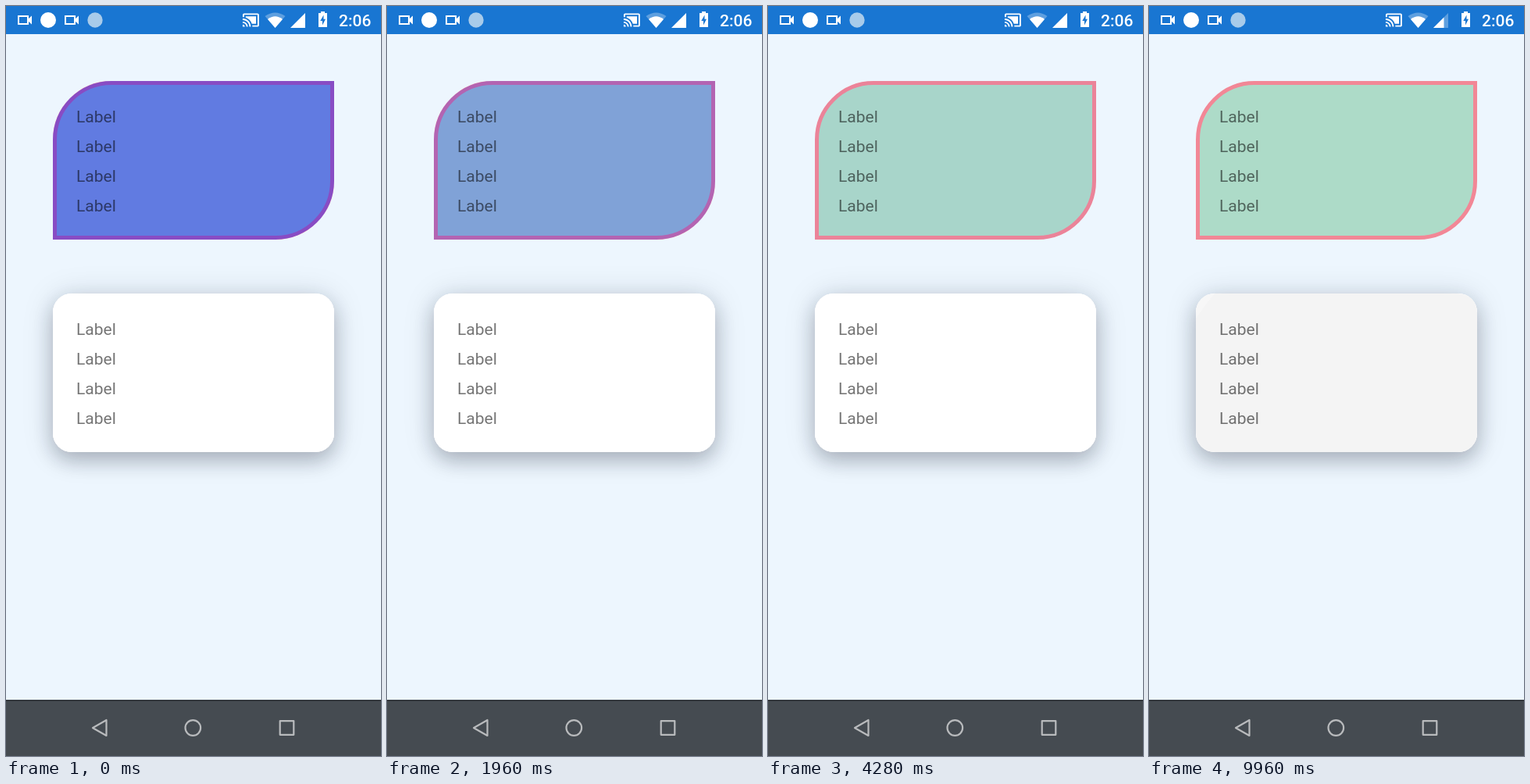
An HTML page with a canvas for the animation above (10000 ms loop, 480x960 px).

```html
<!DOCTYPE html>
<html lang="en">
<head>
<meta charset="utf-8">
<title>Touch ripples on cards</title>
<style>
html, body { margin: 0; width: 100%; height: 100%; overflow: hidden; background: #edf6fe; }
canvas { display: block; width: 480px; height: 960px; }
</style>
</head>
<body>
<canvas id="stage" width="480" height="960"></canvas>
<script>
const LOOP = 10000;
const ctx = document.getElementById('stage').getContext('2d');
const clamp = v => Math.max(0, Math.min(1, v));
const lerp = (a, b, k) => a + (b - a) * k;

// Touches: time down, time up, position
const leafTouches = [
  { down: -525, up: 640, x: 300, y: 215 },
  { down: 1646, up: 3045, x: 300, y: 215 },
  { down: 4246, up: 4335, x: 370, y: 152 }
];
const sheetTouches = [
  { down: 6525, up: 7610, x: 290, y: 500 },
  { down: 8330, up: 8820, x: 290, y: 500 },
  { down: 9540, up: 9630, x: 292, y: 565 }
];

function leafPath(inset) {
  const l = 60 + inset, t = 96 + inset, r = 420 - inset, b = 299 - inset, c = 75 - inset;
  const p = new Path2D();
  p.moveTo(l + c, t);
  p.lineTo(r, t);
  p.lineTo(r, b - c);
  p.arc(r - c, b - c, c, 0, Math.PI / 2);
  p.lineTo(l, b);
  p.lineTo(l, t + c);
  p.arc(l + c, t + c, c, Math.PI, Math.PI * 1.5);
  p.closePath();
  return p;
}

const leaf = leafPath(0);
const leafEdge = leafPath(2.5);
const sheet = new Path2D();
sheet.roundRect(60, 368, 360, 203, 24);

const castIcon = new Path2D('M1 18v3h3c0-1.66-1.34-3-3-3zm0-4v2c2.76 0 5 2.24 5 5h2c0-3.87-3.13-7-7-7z' +
  'm18-7H5v1.63c3.96 1.28 7.09 4.41 8.37 8.37H19V7zM1 10v2c4.97 0 9 4.03 9 9h2c0-6.08-4.93-11-11-11z' +
  'm20-7H3c-1.1 0-2 .9-2 2v3h2V5h18v14h-7v2h7c1.1 0 2-.9 2-2V5c0-1.1-.9-2-2-2z');

function fill(path, color) {
  ctx.fillStyle = color;
  ctx.fill(typeof path === 'string' ? new Path2D(path) : path);
}

function disc(x, y, r, color) {
  ctx.fillStyle = color;
  ctx.beginPath();
  ctx.arc(x, y, r, 0, Math.PI * 2);
  ctx.fill();
}

// Tint fades in while held; on release it tops up quickly, then fades out
function tintLevel(touch, t) {
  const held = clamp((Math.min(t, touch.up) - touch.down) / 600);
  if (t < touch.up) return held;
  const topUp = (1 - held) * 120;
  const after = t - touch.up;
  if (after < topUp) return held + after / 120;
  return clamp(1 - (after - topUp) / 480);
}

const decelerate = k => (1 - Math.pow(400, -k / 1.4)) / (1 - Math.pow(400, -1 / 1.4));

function ripple(path, touches, t, rgb, strength, cy) {
  ctx.save();
  ctx.clip(path);
  for (const touch of touches) {
    const level = tintLevel(touch, t);
    if (level > 0) {
      ctx.fillStyle = `rgba(${rgb},${level * strength})`;
      ctx.fillRect(50, 90, 380, 490);
    }
    const after = t - touch.up;
    if (after > 0 && after < 400) {
      const k = decelerate(after / 800);
      disc(lerp(touch.x, 240, k * 0.35), lerp(touch.y, cy, k * 0.35), 305 * k,
        `rgba(${rgb},${(1 - after / 400) * strength})`);
    }
  }
  ctx.restore();
}

function labels(firstBaseline) {
  ctx.font = '400 21px Roboto, sans-serif';
  ctx.fillStyle = 'rgba(0,0,0,.54)';
  for (let i = 0; i < 4; i++) ctx.fillText('Label', 90, firstBaseline + 38 * i);
}

function camera(x) {
  ctx.strokeStyle = '#fff';
  ctx.lineWidth = 2;
  ctx.strokeRect(x + 1, 13, 12, 10);
  fill(`M${x + 13} 17L${x + 18} 12.5V23.5L${x + 13} 19Z`, '#fff');
}

function statusBar(t) {
  ctx.fillStyle = '#1976d2';
  ctx.fillRect(0, 0, 480, 36);
  camera(15);
  disc(54, 18, 10, '#fff');
  camera(75);
  disc(114, 18, 9.7, '#a8cbea');

  ctx.save();
  ctx.translate(302, 6.6);
  ctx.scale(0.95, 0.95);
  fill(castIcon, '#fff');
  ctx.restore();

  fill('M344.5 28L331.5 13Q344.5 4 357.5 13Z', 'rgba(255,255,255,.3)');
  fill('M344.5 28L335 17Q344.5 9.5 354 17Z', '#fff');

  const weak = t >= 9800;
  fill('M364 28L383 9V28Z', weak ? 'rgba(255,255,255,.3)' : '#fff');
  if (weak) fill('M364 28L377.5 14.5V28Z', '#fff');

  fill('M403 7H408V9H411V27H400V9H403Z', '#fff');
  fill('M406.5 11.5L402.3 19H405V24.5L409 16.7H406.5Z', '#1976d2');

  ctx.font = '500 21px Roboto, sans-serif';
  ctx.fillStyle = '#fff';
  ctx.fillText('2:06', 426, 26);
}

function navBar() {
  ctx.fillStyle = '#454b51';
  ctx.fillRect(0, 888, 480, 72);
  ctx.fillStyle = '#33383d';
  ctx.fillRect(0, 888, 480, 2);
  ctx.strokeStyle = '#b9bbbd';
  ctx.lineWidth = 2.2;
  ctx.lineJoin = 'round';
  ctx.stroke(new Path2D('M111 924L128.5 914V934Z'));
  ctx.beginPath();
  ctx.arc(239.3, 924, 9.8, 0, Math.PI * 2);
  ctx.stroke();
  ctx.strokeRect(350.7, 915.2, 17.6, 17.6);
  ctx.lineJoin = 'miter';
}

function sheetShadow(dy, blur, alpha) {
  ctx.save();
  ctx.shadowColor = `rgba(20,30,45,${alpha})`;
  ctx.shadowBlur = blur;
  ctx.shadowOffsetY = dy;
  fill(sheet, '#fff');
  ctx.restore();
}

function draw(t) {
  ctx.fillStyle = '#edf6fe';
  ctx.fillRect(0, 0, 480, 960);

  fill(leafEdge, '#addbc8');
  ctx.strokeStyle = '#f28796';
  ctx.lineWidth = 5;
  ctx.stroke(leafEdge);
  ripple(leaf, leafTouches, t, '0,0,255', 0.5, 197.5);
  labels(149);

  sheetShadow(3, 40, 0.15);
  sheetShadow(11, 24, 0.24);
  fill(sheet, '#fff');
  ripple(sheet, sheetTouches, t, '0,0,0', 0.0588, 469.5);
  labels(421);

  statusBar(t);
  navBar();
}

let start;
function tick(now) {
  if (start === undefined) start = now;
  draw((now - start) % LOOP);
  requestAnimationFrame(tick);
}
draw(0);
requestAnimationFrame(tick);
</script>
</body>
</html>
```
